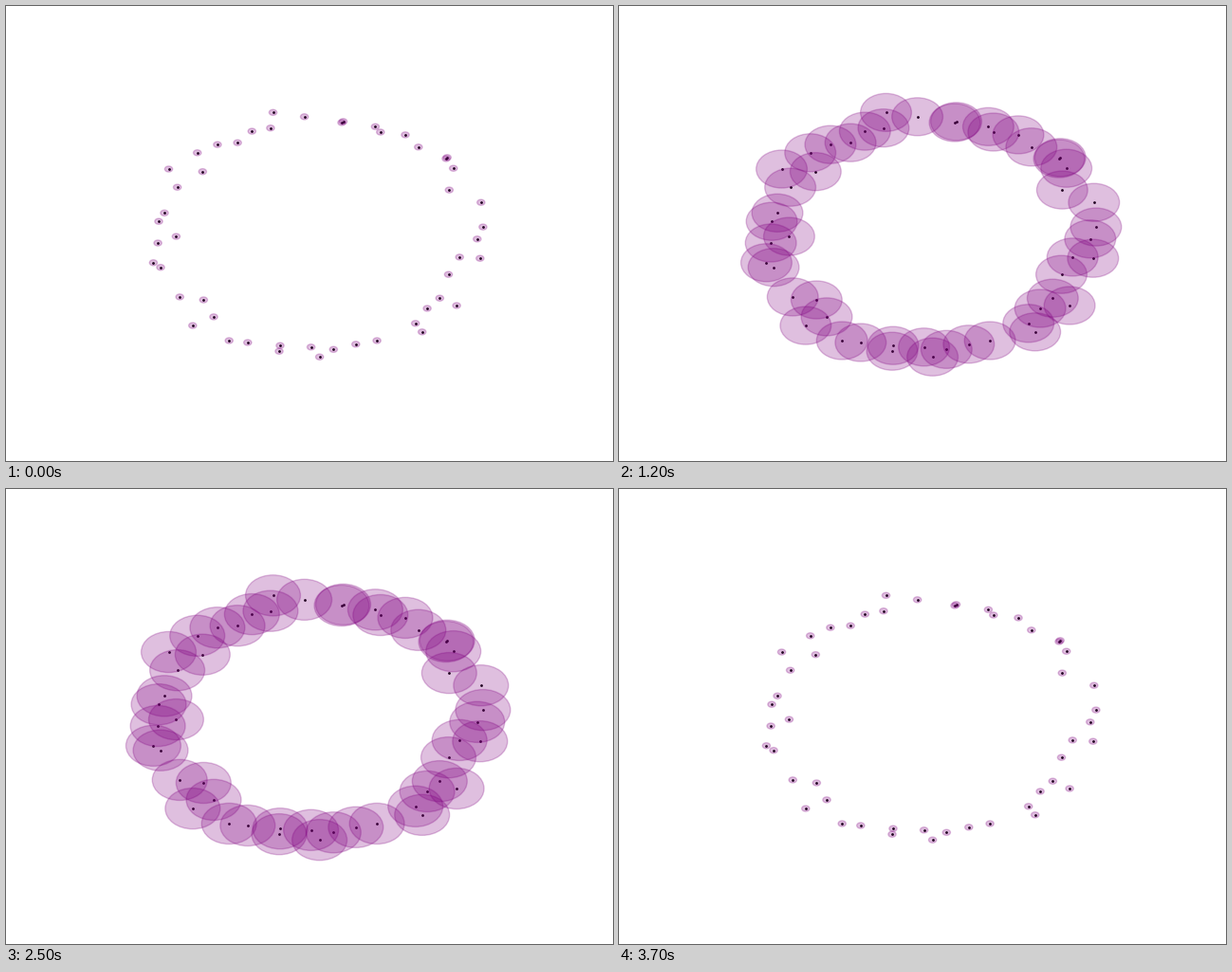
Recreate the animation shown at these times as a matplotlib script. Size 640 px wide and 480 px high, loop 3800 ms.

```python
import matplotlib.pyplot as plt
from matplotlib.animation import FuncAnimation
from matplotlib.patches import Ellipse

W, H, DPI = 640, 480, 100
FRAMES, INTERVAL, PEAK = 38, 100, 19
STEP_X, STEP_Y = 496 / 240, 369.6 / 240  # radius growth per step, in pixels

# Noisy ring of sample points, clockwise from the top left
POINTS = [
    (281.5, 112.3), (314.6, 116.8), (354.0, 123.0), (355.5, 121.8),
    (389.4, 127.3), (394.8, 133.0), (421.0, 135.9), (434.8, 148.8),
    (464.0, 161.0), (465.2, 159.8), (471.7, 171.2), (467.3, 194.1),
    (500.8, 207.2), (502.9, 233.1), (496.8, 245.8), (499.8, 266.2),
    (478.2, 264.9), (466.5, 283.2), (457.3, 308.2), (475.1, 316.0),
    (444.1, 319.0), (431.7, 334.8), (438.7, 343.8), (391.1, 353.0),
    (368.8, 356.8), (345.3, 362.3), (321.6, 359.8), (330.6, 370.2),
    (289.0, 358.2), (288.0, 364.2), (254.8, 355.0), (235.2, 353.0),
    (219.0, 327.9), (196.8, 337.1), (208.3, 310.0), (183.2, 306.9),
    (163.0, 275.7), (155.4, 270.8), (160.1, 250.0), (179.4, 243.1),
    (161.0, 227.2), (167.0, 218.3), (180.6, 191.2), (207.3, 174.7),
    (171.5, 172.0), (201.7, 154.8), (222.9, 146.2), (244.1, 144.2),
    (259.3, 132.1), (278.9, 128.7),
]

fig = plt.figure(figsize=(W / DPI, H / DPI), dpi=DPI, facecolor="white")
ax = fig.add_axes([0, 0, 1, 1])
ax.set_xlim(0, W)
ax.set_ylim(H, 0)
ax.axis("off")

ax.plot(*zip(*POINTS), "ko", markersize=1, zorder=1)
balls = [
    ax.add_patch(Ellipse(p, 1, 1, color="purple", alpha=0.25, linewidth=1, zorder=2))
    for p in POINTS
]


def update(i):
    """Grow every ball linearly up to the peak, then shrink it again."""
    k = max(2, PEAK + 1 - abs(PEAK - i))
    for ball in balls:
        ball.set_width(2 * k * STEP_X)
        ball.set_height(2 * k * STEP_Y)
    return balls


anim = FuncAnimation(fig, update, frames=FRAMES, interval=INTERVAL,
                     repeat=True, repeat_delay=0, blit=False)
plt.show()
```
